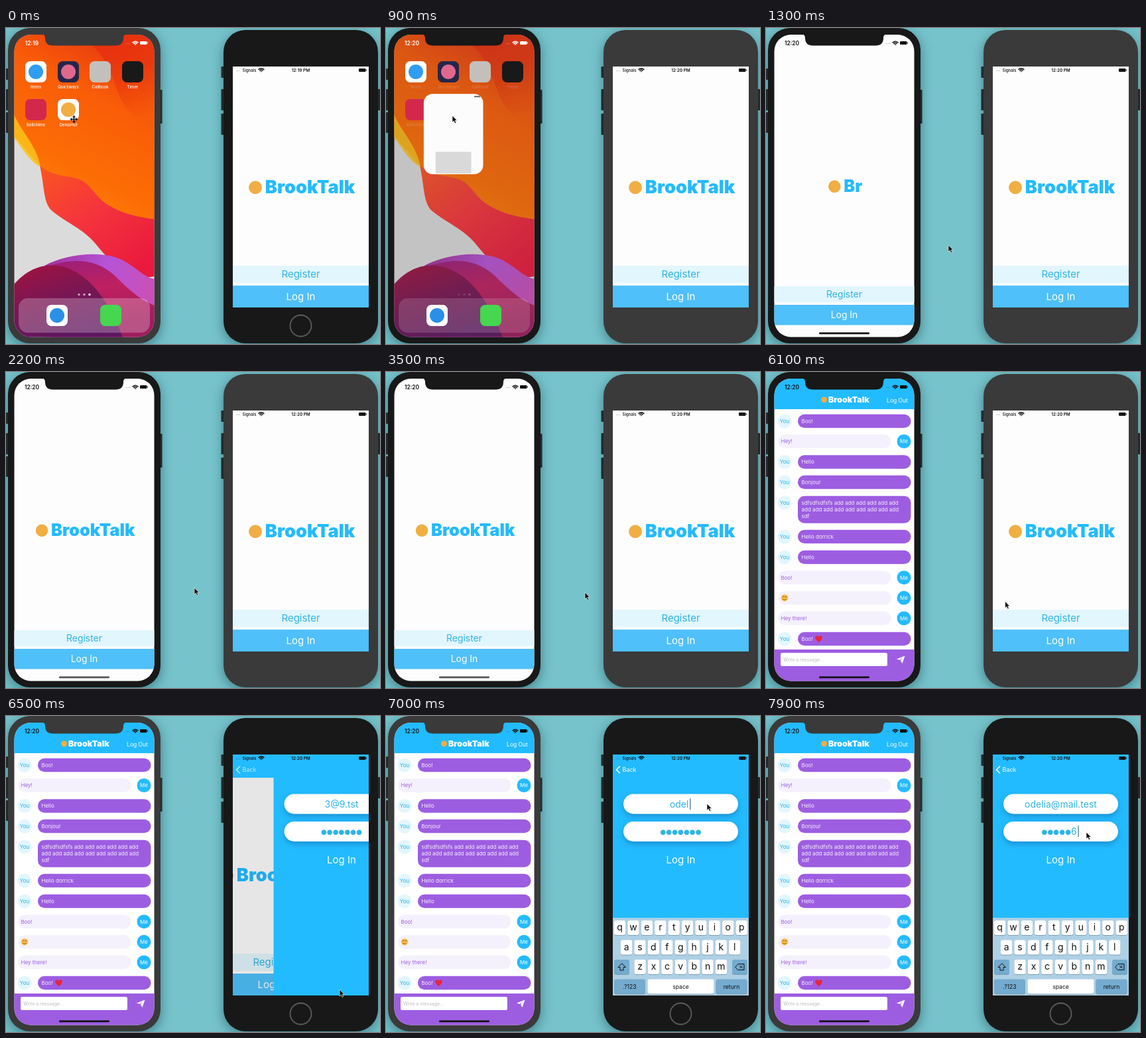
Recreate the animation shown at these times as an HTML page. Size 564 px wide and 476 px high, loop 8 s.

```html
<!DOCTYPE html>
<html lang="en">
<head>
<meta charset="utf-8">
<title>Two phones</title>
<style>
html, body { margin: 0; width: 100%; height: 100%; overflow: hidden; background: #76c3cb; }
svg { display: block; width: 100vw; height: 100vh; font-family: Inter, Roboto, sans-serif; }
</style>
</head>
<body>
<svg viewBox="0 0 564 476">
  <defs>
    <clipPath id="leftScreen"><rect x="12.5" y="10" width="211" height="455.5" rx="25"/></clipPath>
    <clipPath id="rightScreen"><rect x="342" y="58" width="205" height="363"/></clipPath>
    <clipPath id="messages"><rect x="12" y="56" width="212" height="362"/></clipPath>
    <linearGradient id="sun" x1=".1" y1="1" x2=".5" y2="0">
      <stop offset="0" stop-color="#ff8f08"/><stop offset=".35" stop-color="#fc6d05"/>
      <stop offset=".75" stop-color="#f95c08"/><stop offset="1" stop-color="#ea3d10"/>
    </linearGradient>
    <linearGradient id="flare" x1="0" y1="0" x2=".6" y2="1">
      <stop offset="0" stop-color="#e4200f"/><stop offset=".6" stop-color="#e8340c"/><stop offset="1" stop-color="#f65c08"/>
    </linearGradient>
    <linearGradient id="coral" x1="0" y1="0" x2=".8" y2="1">
      <stop offset="0" stop-color="#fb5b1c"/><stop offset=".5" stop-color="#f5353c"/><stop offset="1" stop-color="#e91a3e"/>
    </linearGradient>
    <linearGradient id="violet" x1="0" y1="0" x2="1" y2=".3">
      <stop offset="0" stop-color="#a02f98"/><stop offset=".55" stop-color="#b653d8"/><stop offset="1" stop-color="#c950b8"/>
    </linearGradient>
    <linearGradient id="crimson" x1="0" y1="0" x2=".3" y2="1">
      <stop offset="0" stop-color="#9a1f7c"/><stop offset=".45" stop-color="#bf2060"/><stop offset="1" stop-color="#a01d5e"/>
    </linearGradient>
    <linearGradient id="wine" x1="0" y1="0" x2=".5" y2="1">
      <stop offset="0" stop-color="#a3123f"/><stop offset=".5" stop-color="#7a1653"/><stop offset="1" stop-color="#5f1760"/>
    </linearGradient>
  </defs>
  <g id="stage"></g>
</svg>
<script>
const LOOP = 8000, STEP = 100;
const BLUE = '#23bbff', SKY = '#4fc0f9', PALE = '#e2f6fd', LINK = '#2fb4e4', PURPLE = '#9d5de1', AMBER = '#f0ae43';
const APP = 'BrookTalk', EMAIL = 'odelia@mail.test', PASSWORD = '123456';

const clamp = v => Math.max(0, Math.min(1, v));
const lerp = (a, b, p) => a + (b - a) * p;

// keys: [time, value, value...]; linear between neighbours, held at both ends
function track(keys, t) {
  let i = keys.findIndex(k => k[0] > t);
  if (i < 0) i = keys.length;
  const a = keys[Math.max(0, i - 1)], b = keys[Math.min(i, keys.length - 1)];
  const p = b[0] > a[0] ? clamp((t - a[0]) / (b[0] - a[0])) : 0;
  return a.slice(1).map((v, n) => lerp(v, b[n + 1], p));
}
const glide = (t, start) => track([[0, 0], [100, .32], [200, .7], [300, .92], [400, 1]], t - start)[0];

const rect = (x, y, w, h, fill, r = 0, extra = '') =>
  `<rect x="${x}" y="${y}" width="${w}" height="${h}" rx="${r}" fill="${fill}" ${extra}/>`;
const circle = (x, y, r, fill) => `<circle cx="${x}" cy="${y}" r="${r}" fill="${fill}"/>`;
const path = (d, fill, extra = '') => `<path d="${d}" fill="${fill}" ${extra}/>`;
const line = (d, color, width) => path(d, 'none', `stroke="${color}" stroke-width="${width}" stroke-linecap="round" stroke-linejoin="round"`);
const text = (s, x, y, size, fill, anchor = 'middle', weight = 400) =>
  `<text x="${x}" y="${y}" font-size="${size}" fill="${fill}" text-anchor="${anchor}" font-weight="${weight}">${s}</text>`;
const move = (x, y, body) => `<g transform="translate(${x} ${y})">${body}</g>`;
const fade = (opacity, body) => `<g opacity="${opacity}">${body}</g>`;
const clip = (id, body) => `<g clip-path="url(#${id})">${body}</g>`;

// Round marks lifted to the middle of the capitals, then ordinary text after them
const dots = (count, size, fill, after = '', gap = 0) =>
  `<tspan font-family="DejaVu Sans, sans-serif" font-size="${size}" font-weight="400" fill="${fill}" dy="${-size * .08}">${'●'.repeat(count)}</tspan>` +
  `<tspan dx="${gap}" dy="${size * .08}">${after}</tspan>`;
const title = (x, y, size, fill, count = APP.length) => count < 0 ? '' :
  text(dots(1, size * .95, AMBER, APP.slice(0, count), size * .13), x, y, size, fill, 'middle', 900);

const wifi = (x, y, color) => move(x, y,
  line('M-4-3.6Q0-7 4-3.6M-2.3-1.9Q0-3.9 2.3-1.9', color, 1.4) + circle(0, -.6, .9, color));
const battery = (x, y, color) => rect(x, y, 10.5, 5, color, 1.2) + rect(x + 11, y + 1.6, 1, 1.8, color);

function leftStatus(t, color) {
  return text(t < 100 ? '12:19' : '12:20', 39, 25.5, 8.4, color, 'middle', 600) +
    text('....', 184, 24, 6, color) + wifi(195, 25.5, color) + battery(202, 20, color);
}
function rightStatus(t) {
  return text('....', 350, 65, 6, '#222') + text('Signals', 356.5, 65.8, 6, '#111', 'start', 500) + wifi(385, 66, '#111') +
    text(t < 500 ? '12:19 PM' : '12:20 PM', 444.5, 65.8, 6.4, '#111', 'middle', 600) + battery(532, 61, '#111');
}

function wallpaper() {
  return rect(12, 10, 212, 456, '#dcdbdb') +
    path('M46 190C60 230 53 262 70 276C92 294 116 302 135 325C152 346 165 360 190 371C204 376 215 376 224 374V200Z', 'url(#coral)') +
    path('M12 10H224V288C190 284 168 276 150 264C134 253 126 232 108 227C88 222 66 222 50 206C34 190 24 176 12 162Z', 'url(#sun)') +
    path('M12 130C24 158 46 176 52 209C34 200 24 180 12 165Z', '#fcc21b', 'opacity=".85"') +
    path('M104 10C150 30 157 66 171 102C182 128 205 140 224 158V10Z', 'url(#flare)', 'opacity=".6"') +
    path('M58 358C90 340 150 333 180 352C200 364 210 376 224 378V466H58Z', 'url(#violet)') +
    path('M66 358C108 345 140 350 165 374C188 397 204 410 224 418V466H66Z', 'url(#crimson)') +
    path('M12 386C35 360 60 354 84 359C120 368 152 402 176 466H12Z', 'url(#wine)');
}

const ICONS = [
  ['Items', 29, 50, '#fff', '#2f9df2'], ['Quickways', 78, 50, '#25264a', '#e0688f'],
  ['Callbook', 126, 50, '#c3c0bb'], ['Timer', 175, 50, '#191919'],
  ['Bellchime', 29, 107, '#d3284c'], ['DemoHut', 78, 107, '#fff', AMBER],
  ['', 61, 417, '#fff', '#2a8fe8'], ['', 142, 417, '#46d64f']
];

function homeScreen(t) {
  const away = clamp((t - 600) / 300);
  const tiles = ICONS.map(([, x, y, tile, mark]) =>
    rect(x, y, 32, 32, tile, 7.5) + (mark ? circle(x + 16, y + 16, 11, mark) : '')).join('');
  const labels = ICONS.map(([name, x, y]) => text(name, x + 16, y + 41, 6, '#fff', 'middle', 500)).join('');
  return wallpaper() + rect(12, 10, 212, 456, '#444', 0, `opacity="${away * .16}"`) +
    rect(19, 407, 198, 52, '#fff', 14, `opacity="${.24 - away * .1}"`) +
    fade(1 - away * .8, labels + [110, 118, 126].map((x, i) => circle(x, 401.5, 1.7, i < 2 ? '#ffffff99' : '#fff')).join('')) +
    `<g style="filter:blur(${away * .7}px)">${tiles}</g>` + leftStatus(t, '#fff');
}

// Buttons and title of the first app page
function welcome({ x, w, y, h, register, login, size, label, titleY }, count) {
  const c = x + w / 2;
  return rect(x, y, w, h, '#fdfdfd') + title(c + 1, titleY, size, BLUE, count) +
    rect(x, register[0], w, register[1], PALE) + text('Register', c, register[0] + register[1] / 2 + label * .36, label, LINK) +
    rect(x, login[0], w, login[1], SKY) + text('Log In', c, login[0] + login[1] / 2 + label * .36, label, '#fff');
}
const LEFT = { x: 12, w: 212, y: 10, h: 456, register: [389, 24], login: [417, 30.5], size: 25.4, label: 13.9, titleY: 246.5 };
const RIGHT = { x: 342, w: 205, y: 58, h: 363, register: [358, 26], login: [388, 33], size: 27.2, label: 15, titleY: 249 };

function launch(t) {
  const p = glide(t, 800);
  if (p === 0) return '';
  const w = lerp(32, 212, p), h = lerp(32, 456, p ** 1.37);
  const x = lerp(94, 118, p) - w / 2, y = lerp(123, 238, p) - h / 2;
  if (p === 1) return welcome(LEFT, Math.floor((t - 1100) / 100));
  return rect(x, y, w, h, '#fcfcfc', 8 + p * 17) +
    fade(1 - p, rect(x + w * .2, y + h * .72, w * .6, h * .27, '#c9c9c9', 2) + rect(x + w * .85, y + 3, w * .1, 2, '#222'));
}

const back = (x, y) => line(`M${x + 5} ${y - 5}l-5 5 5 5`, '#fff', 1.6) + text('Back', x + 9, y + 3.2, 9, '#fff', 'start');

// Local coordinates: the top left corner lies just below the navigation bar
function loginPage(w, h, email, password) {
  const field = y => rect(16, y, w - 32, 30, '#fff', 15, 'style="filter:drop-shadow(0 4px 4px #0a559066)"');
  return rect(0, -1, w, h, BLUE) + field(24.5) + field(66) +
    text(email, w / 2, 44.5, 14, LINK) + text(password, w / 2, 86, 14, LINK) + text('Log In', w / 2, 129, 15, '#fff');
}
const CARET = '<tspan fill="#1b5f8c">|</tspan>';
const hidden = (count, after) => dots(count, 10.2, LINK, after);

// Old page moves aside and darkens while the new one slides over it
function push(p, w, box, oldPage, newPage) {
  if (p === 0) return oldPage;
  return (p < 1 ? move(-.3 * w * p, 0, oldPage) + rect(...box, '#000', 0, `opacity="${.13 * p}"`) : '') + move(w * (1 - p), 0, newPage);
}

const MESSAGES = [
  [74, 'You', 'Boo!'], [104.5, 'Me', 'Hey!'], [135.5, 'You', 'Hello'], [166, 'You', 'Bonjour'],
  [197, 'You', 'sdfsdfsdfsfs add add add add add add', 'add add add add add add add add add', 'sdf'],
  [248, 'You', 'Hello dorrick'], [279, 'You', 'Hello'], [309.7, 'Me', 'Boo!'], [340.3, 'Me', ''],
  [371, 'Me', 'Hey there!'], [402, 'You', 'Boo!']
];
const smiley = circle(28, 340.3, 5.2, '#f9c04a') + line('M24.8 339l1.8-1 1 1M29 339l1-1 1.6 1M25.5 342.3q2.5 2.4 5 0', '#8a4a1c', .9);
const heart = path('M79.5 407C72 401.5 74 396.5 77 397.2Q79 397.6 79.5 399.6Q80.2 397.6 82 397.2C85.3 396.6 87 401.5 79.5 407Z', '#e8263c');

function message([y, who, ...lines]) {
  const mine = who === 'Me', ink = mine ? PURPLE : '#f6effd';
  return circle(mine ? 208 : 28, y, 10.5, mine ? BLUE : PALE) +
    text(who, mine ? 208 : 28, y + 2.8, 8, mine ? '#fff' : '#26afe9') +
    rect(mine ? 18 : 48, y - 10.3, 170.5, 20.6 + (lines.length - 1) * 10.2, mine ? '#f4f1fc' : PURPLE, 10) +
    lines.map((s, i) => text(s, mine ? 22.5 : 53.5, y + 2.9 + i * 10.2, 8, ink, 'start')).join('');
}

function chatPage() {
  return rect(12, 10, 212, 456, '#fff') + clip('messages', MESSAGES.map(message).join('') + smiley + heart) +
    rect(12, 10, 212, 46, BLUE) + title(119, 46, 12.4, '#fff') + text('Log Out', 198, 46, 8.5, '#fff') +
    rect(12, 418, 212, 48, PURPLE) + rect(22, 423, 161, 20, '#fff', 2.5) +
    text('Write a message...', 26, 435.6, 7, '#bbb', 'start') +
    path('M197 432.5L209.5 427.5L205.5 439L202.8 434.3L207 430L201.5 433.8Z', '#fff');
}

function leftScreen(t) {
  if (t < 1200) return homeScreen(t) + launch(t);
  const toLogin = glide(t, 5200), toChat = glide(t, 5700), box = [12, 10, 212, 456];
  const login = move(12, 56, loginPage(212, 412, '3@9.tst', hidden(7)));
  const page = toChat > 0 ? push(toChat, 212, box, login, chatPage()) : push(toLogin, 212, box, launch(t), login);
  const bar = toLogin > 0 && toChat < 1 ? rect(12, 10, 212, 46, BLUE) + back(18, 43) : '';
  return page + bar + leftStatus(t, '#111') + rect(80, 458.6, 76, 2.6, t < 2200 || toLogin ? '#111' : '#555', 1.3);
}

function keyboard() {
  const key = (x, y, w, fill = '#fff') => rect(x, y + 1, w, 22, '#7f9fb4', 3) + rect(x, y, w, 22, fill, 3);
  const row = (letters, x, y) => [...letters].map((c, i) =>
    key(x + i * 20.4, y, 17.2) + text(c, x + i * 20.4 + 8.6, y + 15.3, 14, '#111')).join('');
  const GREY = '#74abce';
  return rect(342, 304, 205, 117, '#aed0e5') + row('qwertyuiop', 344, 308) + row('asdfghjkl', 354, 337.5) + row('zxcvbnm', 374.5, 367) +
    key(344, 367, 23, GREY) + line('M355.5 373l-5.5 5.5h3v4.5h5v-4.5h3z', '#111', 1) +
    key(522, 367, 23, GREY) + line('M527 378l4-4.5h9v9h-9zM533.5 376l4 4m0-4l-4 4', '#111', 1) +
    key(344, 396.5, 47, GREY) + text('.?123', 367.5, 410.6, 8.6, '#111') +
    key(394.5, 396.5, 100) + text('space', 444.5, 410.6, 8.6, '#111') +
    key(497.5, 396.5, 47, GREY) + text('return', 521, 410.6, 8.6, '#111');
}

function rightScreen(t) {
  const p = glide(t, 6300);
  const typedMail = EMAIL.slice(0, Math.round((t - 6900) / 25));
  const email = t < 7000 ? '3@9.tst' : t < 7400 ? typedMail + CARET : EMAIL;
  const typed = Math.min(PASSWORD.length, Math.round((t - 7300) / 100));
  const password = t < 7400 ? hidden(7) : hidden(typed - 1, PASSWORD[typed - 1] + CARET);
  const login = move(342, 93, loginPage(205, 330, email, password));
  const bar = p > 0 ? rect(342, 58, 205, 35, BLUE) + fade(p, back(347.5, 81)) : '';
  const [drop] = track([[6800, 118], [6900, 40], [7000, 0]], t);
  return push(p, 205, [342, 58, 205, 363], welcome(RIGHT), login) + bar + rightStatus(t) +
    (drop < 118 ? move(0, drop, keyboard()) : '');
}

const bodyColor = active => active ? '#181818' : '#3a3a3a';
function phone(x, y, w, h, active, buttons) {
  return buttons.map(([bx, by, bh]) => rect(bx, by, 5, bh, '#252729', 1)).join('') +
    rect(x, y, w, h, bodyColor(active), 33, 'style="filter:drop-shadow(0 5px 9px #0c3a4480)"');
}

const CURSOR = [
  [500, 100, 132], [900, 100, 132], [1100, 190, 240], [1300, 275, 327], [2200, 284, 325], [2700, 292, 329], [3300, 300, 332],
  [3500, 300, 332], [3800, 205, 365], [4200, 120, 258], [4400, 120, 258], [4600, 205, 203], [4800, 395, 235], [5000, 300, 360],
  [5200, 205, 420], [5300, 205, 420], [5600, 122, 182], [5800, 122, 182], [6200, 440, 400], [6300, 503, 412], [6500, 503, 412],
  [6800, 484, 132], [7200, 484, 132], [7400, 483, 175]
];
function cursor(t) {
  if (t < 200) return move(102.5, 137.5, line('M-4 0H4M0-4V4', '#111', 1.5) +
    path('M-6 0l3-2.5v5zM6 0l-3-2.5v5zM0-6l-2.5 3h5zM0 6l-2.5-3h5z', '#111'));
  return move(...track(CURSOR, t), path('M0 0V10L2.3 8L4 11.6L5.8 10.7L4.2 7.3H7.2Z', '#111', 'stroke="#fff" stroke-width=".6"'));
}

function scene(t) {
  const leftActive = t >= 500 && t < 6200;
  const notch = path('M54 9Q59 10 59 15Q59 26.5 71 26.5H165Q177 26.5 177 15Q177 10 182 9Z', bodyColor(leftActive));
  return rect(0, 0, 564, 476, '#76c3cb') +
    phone(3, 0, 230, 475, leftActive, [[0, 61, 17], [0, 92, 32], [0, 127, 31], [230.5, 93, 51]]) +
    clip('leftScreen', leftScreen(t)) + notch +
    phone(328, 3, 233, 472, !leftActive, [[324.5, 58, 17], [324.5, 92, 32], [324.5, 129, 32], [559.5, 92, 32]]) +
    clip('rightScreen', rightScreen(t)) +
    (leftActive ? '' : '<circle cx="444.5" cy="448.5" r="16" fill="none" stroke="#5c5c5c" stroke-width="1.8"/>') +
    cursor(t);
}

const stage = document.getElementById('stage');
let shown = -1;
function frame() {
  const t = Math.floor(performance.now() % LOOP / STEP) * STEP;
  if (t !== shown) stage.innerHTML = scene(shown = t);
  requestAnimationFrame(frame);
}
frame();
</script>
</body>
</html>
```
